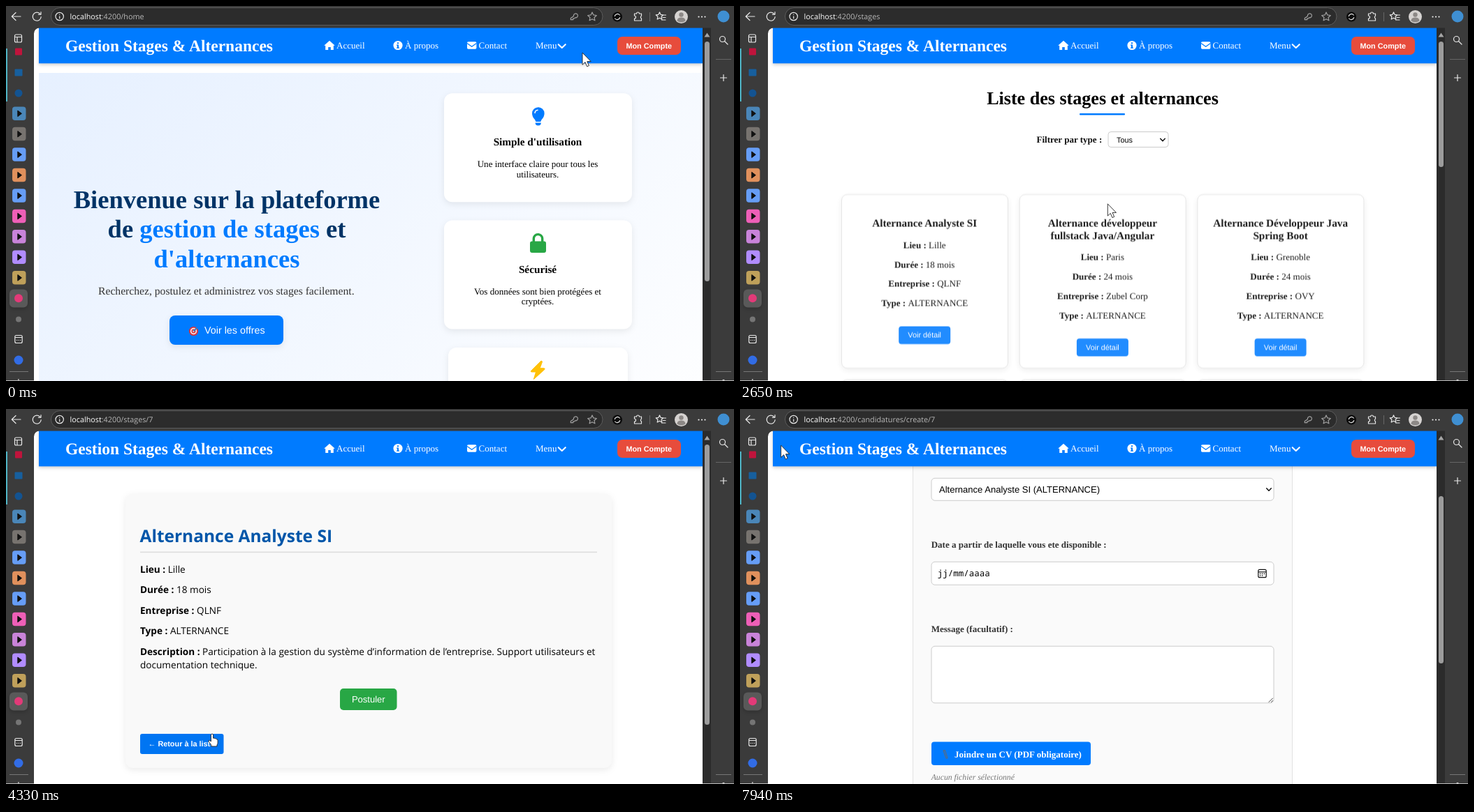
Animation of 1042 by 538 pixels, one loop 8000 ms. Source, as an HTML page:

```html
<!DOCTYPE html>
<html lang="fr">
<head>
<meta charset="utf-8">
<title>Gestion Stages &amp; Alternances</title>
<style>
html, body { margin: 0; width: 100%; height: 100%; overflow: hidden; background: #3b3b3b; }
svg { display: block; width: 100%; height: 100%; }
text { white-space: pre; font: 13.04px "Liberation Serif", "Times New Roman", serif; text-rendering: geometricPrecision; }
.b { font-weight: bold; }
.i { font-style: italic; }
.sans { font-family: "Liberation Sans", Arial, sans-serif; }
.ui { font-family: "Open Sans", "Noto Sans", sans-serif; }
.mono { font-family: "Noto Sans Mono", "DejaVu Sans Mono", monospace; }
.soft { filter: drop-shadow(0 3px 5px rgba(0,0,0,.08)); }
.deep { filter: drop-shadow(0 2px 2.5px rgba(0,0,0,.2)); }
.line { fill: none; stroke: #e8e8e8; stroke-width: 1.2; stroke-linecap: round; stroke-linejoin: round; }
</style>
</head>
<body>
<svg id="stage" viewBox="0 0 1042 538" preserveAspectRatio="none" xmlns="http://www.w3.org/2000/svg"></svg>
<script>
const LOOP = 8000, STEP = 67.86;
const BLUE = '#007bff';

// ---- drawing helpers ----
const text = (x, y, s, o = {}) =>
  `<text x="${x}" y="${y}" class="${o.c || ''}" fill="${o.fill || '#000'}"` +
  `${o.mid ? ' text-anchor="middle"' : ''} ${o.id ? `id="${o.id}"` : ''} style="font-size:${o.size || 13.04}px">${s}</text>`;
const mid = (x, y, s, o = {}) => text(x, y, s, { ...o, mid: true });
const rect = (x, y, w, h, fill, r = 0, extra = '') =>
  `<rect x="${x}" y="${y}" width="${w}" height="${h}" rx="${r}" fill="${fill}" ${extra}/>`;
const disc = (x, y, r, fill, extra = '') => `<circle cx="${x}" cy="${y}" r="${r}" fill="${fill}" ${extra}/>`;
const path = (d, fill, extra = '') => `<path d="${d}" fill="${fill}" ${extra}/>`;
const line = (d, extra = '') => `<path class="line" d="${d}" ${extra}/>`;
const group = (id, s) => `<g id="${id}">${s}</g>`;
const field = (x, y, w, h, r) => rect(x, y, w, h, '#fff', r, 'stroke="#ccc"');
const chevron = (x, y) => line(`M${x - 3.3} ${y - 1.7}l3.3 3.4l3.3 -3.4`, 'style="stroke:#111;stroke-width:1.5"');
const bold = s => `<tspan class="b">${s}</tspan>`;

// ---- home ----
function feature(y, title, lines) {
  return rect(627, y, 269, 156, '#fff', 12, 'class="soft"') +
    mid(761, y + 75, title, { c: 'b', size: 15.26 }) +
    lines.map((s, i) => mid(761, y + 106 + i * 14.6, s)).join('');
}
const bulb = path('M757 163q-4-4-4-9a8.8 8.8 0 0 1 17.6 0q0 5-4 9l-1.4 3h-6.8z', BLUE) +
  path('M757.6 167.5h8.2q0 4-4.1 4t-4.1-4z', BLUE) +
  '<path d="M757 154q0-4.6 4.6-4.8" fill="none" stroke="#fff" stroke-width="1.5"/>';
const lock = rect(750, 337.5, 23, 16.5, '#28a745', 3) +
  '<path d="M755.3 339v-5.2a6.2 6.2 0 0 1 12.4 0v5.2" fill="none" stroke="#28a745" stroke-width="3.4"/>';
const target = [[6.6, '#d8343f'], [4.7, '#f6e9ea'], [3, '#d8343f'], [1.2, '#fff']]
  .map(([r, f]) => disc(268.5, 466.5, r, f)).join('') +
  '<path d="M268.5 466.5l5-5" stroke="#2d7fc4" stroke-width="1.8"/>';
const home =
  rect(47, 96, 950, 442, 'url(#hero)') +
  mid(316, 289.5, 'Bienvenue sur la plateforme', { c: 'b', size: 36.52, fill: '#036' }) +
  mid(316, 332.3, `de <tspan fill="${BLUE}">gestion de stages</tspan> et`, { c: 'b', size: 36.52, fill: '#036' }) +
  mid(316, 375, "d'alternances", { c: 'b', size: 36.52, fill: BLUE }) +
  mid(315.3, 413.6, 'Recherchez, postulez et administrez vos stages facilement.', { size: 15.65, fill: '#333' }) +
  rect(234, 444, 163, 42, BLUE, 8, 'class="soft"') + target +
  text(284, 470, 'Voir les offres', { c: 'sans', size: 14.34, fill: '#fff' }) +
  feature(125.3, "Simple d'utilisation", ['Une interface claire pour tous les', 'utilisateurs.']) + bulb +
  feature(307.5, 'Sécurisé', ['Vos données sont bien protégées et', 'cryptées.']) + lock +
  rect(633, 490, 257, 156, '#fff', 12, 'class="soft"') +
  path('M766 509l-14.5 14.5q-.8 1.5 1 1.5h6l-3.2 10.5l15.5-14q1-1.7-1-1.8h-5.6l3.4-9.6z', '#ffc107', 'stroke="#ffc107" stroke-linejoin="round"');

// ---- list of offers ----
const OFFERS = [
  [145, ['Alternance Analyste SI'], 'Lille', '18 mois', 'QLNF'],
  [399.7, ['Alternance développeur', 'fullstack Java/Angular'], 'Paris', '24 mois', 'Zubel Corp'],
  [654.4, ['Alternance Développeur Java', 'Spring Boot'], 'Grenoble', '24 mois', 'OVY']
];
const panel = (x, y) => rect(x + .5, y, 238, 249, '#fff', 8, 'stroke="#e3e3e3" class="soft"');
function offer([x, title, place, time, firm], i) {
  const c = x + 119.2, dy = 268 + (title.length - 1) * 17.5;
  const rows = [['Lieu', place], ['Durée', time], ['Entreprise', firm], ['Type', 'ALTERNANCE']];
  return group('offer' + i, panel(x, 268) +
    title.map((s, k) => mid(c, 314 + k * 17.5, s, { c: 'b', size: 15.26 })).join('') +
    rows.map(([k, v], n) => mid(c, dy + 76.7 + n * 27.8, bold(k + ' : ') + v)).join('') +
    rect(c - 37, dy + 189, 74, 25.5, BLUE, 4) +
    mid(c, dy + 205.4, 'Voir détail', { c: 'sans', size: 10.87, fill: '#fff' }));
}
const list =
  mid(519, 141.3, 'Liste des stages et alternances', { c: 'b', size: 26.08 }) +
  rect(486, 154, 65, 2.4, BLUE, 1) +
  text(424.5, 196, 'Filtrer par type :', { c: 'b', fill: '#111' }) +
  field(527, 180.5, 86, 22, 4) + text(539, 195.7, 'Tous', { c: 'sans', size: 10.87 }) + chevron(605, 192) +
  group('cards', OFFERS.map(offer).join('') + OFFERS.map(o => panel(o[0], 533.5)).join(''));

// ---- offer detail ----
const detail =
  rect(171, 121, 696, 394, '#f9f9f9', 11, 'class="soft"') +
  text(191.5, 191, 'Alternance Analyste SI', { c: 'ui b', size: 24.5, fill: '#0056a9' }) +
  rect(192, 204.6, 654, 1.6, '#ddd') +
  [['Lieu', 'Lille'], ['Durée', '18 mois'], ['Entreprise', 'QLNF'], ['Type', 'ALTERNANCE'],
   ['Description', 'Participation à la gestion du système d’information de l’entreprise. Support utilisateurs et']]
    .map(([k, v], i) => text(192, 234.6 + i * 29.6, bold(k + ' : ') + v, { c: 'ui', size: 13.6 })).join('') +
  text(192, 372, 'documentation technique.', { c: 'ui', size: 13.6 }) +
  rect(478, 401, 81.5, 31, '#28a745', 5, 'id="apply"') +
  mid(518.8, 420.7, 'Postuler', { c: 'sans', fill: '#fff' }) +
  rect(192, 466, 119.5, 29, BLUE, 3, 'id="back"') +
  text(203.5, 484.2, '← Retour à la liste', { c: 'sans b', size: 10.87, fill: '#fff' });

// ---- application form ----
const label = (y, s) => text(273.7, y, s, { c: 'b', fill: '#333' });
const agenda = '<g fill="none" stroke="#111" stroke-width="1.2"><rect x="741.8" y="393.3" width="11.4" height="11.4" rx="2"/><path d="M742 396.8h11"/></g>' +
  [0, 1, 2, 3, 4].map(i => disc(744.6 + i % 3 * 2.9, 399.4 + (i > 2) * 2.7, .8, '#111')).join('');
const clip = '<path d="M291.5 654l3.2 9.2q1 1.8 2.2.3l-3-9.6q-1.2-2.2-2.8-.8l3 8" fill="none" stroke="#5d6b7c" stroke-width="1.2"/>';
const form =
  mid(519, 130.2, 'Créer une candidature', { c: 'b', size: 19.56, fill: '#1e3a8a' }) +
  rect(247.5, 161.5, 543, 700, '#fafafa', 6, 'stroke="#e2e2e2"') +
  label(242, 'Sélectionner un stage/alternance :') +
  field(274, 262.3, 490, 32, 5) + text(285, 283, '', { c: 'sans', id: 'choice' }) + chevron(757, 278.5) +
  label(362, 'Date a partir de laquelle vous ete disponible :') +
  field(274, 382.3, 490, 33, 5) + text(282.7, 403.3, 'jj/mm/aaaa', { c: 'mono', size: 12.5 }) + agenda +
  label(483, 'Message (facultatif) :') + field(274, 503.3, 490, 81.5, 5) +
  line('M757 583.5l5.5-5.5M760.5 583.5l2-2', 'style="stroke:#444;stroke-width:1"') +
  rect(274, 640.5, 228, 33.5, BLUE, 4) + clip +
  text(307, 663, 'Joindre un CV (PDF obligatoire)', { c: 'b', fill: '#fff' }) +
  text(273.7, 695, 'Aucun fichier sélectionné', { c: 'i', size: 11.74, fill: '#777' });

// ---- site header ----
const nav = (x, s) => text(x, 61.3, s, { fill: '#fff' });
const header =
  rect(47, 31, 950, 51.3, BLUE, 0, 'class="deep"') +
  text(85, 65, 'Gestion Stages &amp; Alternances', { c: 'b', size: 23.5, fill: '#fff' }) +
  path('M463 49.8l7.8 7h-2v6.2h-4v-4h-3.6v4h-4v-6.2h-2z', '#fff') + nav(473, 'Accueil') +
  disc(561, 56.5, 6.6, '#fff') + path('M560 52.2h2v2h-2zM559 55.5h3v4h1v1.3h-4v-1.3h1v-2.7h-1z', BLUE) + nav(571, 'À propos') +
  rect(660, 51.3, 13.4, 10.4, '#fff', 1.6) +
  `<path d="M660 53.5l6.7 4.8l6.7-4.8" fill="none" stroke="${BLUE}" stroke-width="1.2"/>` + nav(676.5, 'Contact') +
  nav(758, 'Menu') + line('M790.7 55.2l5 4.8l5-4.8', 'style="stroke:#fff;stroke-width:2.1"') +
  rect(875, 44, 91, 26, '#e74c3c', 7) + mid(920.3, 60.8, 'Mon Compte', { c: 'sans b', size: 10.87, fill: '#fff' });
const menu =
  rect(746, 74, 163.5, 62.5, BLUE, 3, 'class="deep"') + rect(746, 74, 163.5, 31, '#2490ff', 2, 'id="pick"') +
  text(758, 94, 'Stages/Alternances') + text(758, 125, 'Mes Candidatures');

// ---- browser window ----
const DARK = '#3b3b3b';
const TABS = ['#4a86b8', '#77736f', '#669df6', '#e0905c', '#669df6', '#ee5fb7', '#c983d9', '#b18cff', '#bfa05a'];
const star = (x, y, r) => 'M' + Array.from({ length: 10 }, (_, i) => {
  const a = i * Math.PI / 5 - Math.PI / 2, q = i % 2 ? r * .48 : r;
  return (x + q * Math.cos(a)).toFixed(1) + ' ' + (y + q * Math.sin(a)).toFixed(1);
}).join('L') + 'z';
const grey = 'style="stroke:#a0a0a0"';
const chrome =
  path('M0 0H1042V538H1009V31.5H48a8 8 0 0 0-8 8V538H0z', DARK) +
  rect(64.5, 2.5, 789.5, 25, '#2c2c2c', 12.5, 'stroke="#5c5c5c"') +
  line('M21 15H8.5M14 9.5L8.3 15l5.7 5.5') +
  line('M49 11.5a6 6 0 1 0 1.2 4M50 8.5v3.6h-3.6') +
  line('M71 15a5.7 5.7 0 1 0 11.4 0a5.7 5.7 0 1 0-11.4 0M76.7 14.8v3M76.7 12.2v.1') +
  text(91.5, 19.2, '', { c: 'ui', size: 10.8, fill: '#b8b8b8', id: 'address' }) +
  line('M812.5 14.5a3 3 0 1 1 2.2 2.2l-1.2 1.2h-1.8v1.8h-3.4v-2.2z', grey) +
  line(star(839, 15.5, 6.6), grey) +
  disc(875, 15.5, 7, '#0c0c0c') + line('M871.3 14.5a4 4 0 0 1 7-1.5M878.7 16.5a4 4 0 0 1-7 1.5') +
  line('M899.5 11h3a2 2 0 0 1 4 0h3v3.2a2 2 0 0 0 0 3.6V21h-10v-3a2 2 0 0 0 0-4z') +
  rect(921, 9, 1, 13, '#666') +
  line(star(935.5, 14.5, 5.6) + 'M940.5 13h4M940 16.5h4M938.5 20h5.5') +
  disc(966.5, 15.5, 9.5, '#d6d3d1') + disc(966.5, 12.5, 3.2, '#8c8886') + path('M960.5 21.5q0-5 6-5t6 5q-6 4-12 0z', '#8c8886') +
  [991.5, 996, 1000.5].map(x => disc(x, 15.5, 1.1, '#eee')).join('') +
  disc(1027, 15, 8.5, '#3f8fd2') +
  // left strip
  rect(0, 61, 2, 76, '#4fb3c4') +
  line('M12.5 43a2 2 0 0 1 2-2h6a2 2 0 0 1 2 2v7a2 2 0 0 1-2 2h-6a2 2 0 0 1-2-2zM12.5 44.5h10M16 44.5v7') +
  rect(13, 60.5, 10, 10, '#c0143c', 1) + rect(12.5, 90.5, 11, 10, '#175f9e', 1) + disc(18, 125, 5.5, '#135391') +
  TABS.map((f, i) => rect(9, 144.4 + i * 29.45, 19.5, 19.5, f, 4) +
    path(`M16.8 ${150 + i * 29.45}l5.6 4.3l-5.6 4.3z`, '#111', 'stroke="#111" stroke-linejoin="round"')).join('') +
  rect(5, 406.5, 26, 26, '#595959', 6, 'class="deep"') + disc(18, 419.3, 6, '#e23a78') +
  disc(18, 449.5, 4, '#757575') +
  line('M12.8 474.5a2 2 0 0 1 2-2h6.4a2 2 0 0 1 2 2v7a2 2 0 0 1-2 2h-6.4a2 2 0 0 1-2-2zM13 475.5h10M15.5 479.5h.1M18 479.5h.1M20.5 479.5h.1') +
  disc(18, 508, 6.5, '#326ce5') +
  rect(5, 524, 27, 1, '#777') + rect(17.3, 535, 1.2, 3, '#ddd') +
  // right strip
  line('M1021.5 47.5a4 4 0 1 0 8 0a4 4 0 1 0-8 0M1028.5 50.5l4.5 4.5') +
  rect(1016, 76, 22, 1, '#666') + line('M1022.5 103h9M1027 98.5v9') +
  rect(1016, 524, 22, 1, '#777') + disc(1027, 537.5, 1.8, '#ddd') +
  rect(0, 537, 40, 1, '#bbb') + rect(997, 537, 45, 1, '#bbb');
const scrollbar = rect(997, 31, 12, 507, '#2b2b2b') + path('M1003.5 38.5l4 6h-8z', '#a5a5a5') +
  rect(1000, 51, 7, 100, '#9c9c9c', 3.5, 'id="thumb"');

const cursor =
  path('M0 0V17.3L4 13.6L6.6 19.8L9.4 18.6L6.8 12.6H12.2z', '#fff', 'id="arrow" stroke="#222" stroke-width=".9" stroke-linejoin="round"') +
  path('M-2.6 0Q-1-2 .6 0V5.3Q2.2 4.3 3 5.8Q4.6 5.1 5.3 6.8Q7 6.4 7.1 8.4V12Q7 13.8 6 15V17H-2V15.2L-6 10Q-6.4 7.9-4.6 8.4L-2.6 10z',
    '#fff', 'id="hand" stroke="#222" stroke-width=".9" stroke-linejoin="round"');

document.getElementById('stage').innerHTML =
  '<defs><linearGradient id="hero" gradientUnits="userSpaceOnUse" x1="144" y1="-1" x2="900" y2="754">' +
  '<stop stop-color="#e6f0ff"/><stop offset="1" stop-color="#fff"/></linearGradient></defs>' +
  rect(0, 0, 1042, 538, '#fff') +
  group('home', home) + group('list', list) + group('detail', detail) + group('form', form) +
  header + group('menu', menu) + scrollbar + chrome + group('cursor', cursor);

// ---- timeline ----
const $ = id => document.getElementById(id);
const PAGES = [
  [0, 'home', 'home', 344], [2270, 'list', 'stages', 180],
  [4050, 'detail', 'stages/7', 402], [5620, 'form', 'candidatures/create/7', 240]
];
const POINTER = [
  [70, 825, 67], [290, 795, 44], [420, 788, 54], [620, 780, 78], [810, 785, 90],
  [900, 785, 90], [1350, 800, 117], [1500, 800, 117], [1760, 803, 91], [1930, 803, 91],
  [2100, 800, 86], [2240, 796, 90], [2450, 640, 205], [2647, 526, 284], [2720, 508, 310],
  [2950, 290, 470], [3120, 98, 515], [3300, 200, 490], [3440, 350, 468], [3529, 414, 463],
  [3595, 424, 462], [3850, 272, 468], [4080, 270, 469], [4240, 288, 472], [4340, 296, 467],
  [4410, 296, 467], [4700, 380, 430], [5020, 518, 391], [5240, 513, 402],
  [5430, 513, 402], [5497, 509, 402], [5564, 509, 402], [5632, 512, 411],
  [5900, 470, 340], [6170, 388, 279], [6300, 388, 280], [6440, 391, 297],
  [6720, 410, 329], [7397, 410, 329], [7600, 300, 235], [7800, 120, 92], [7940, 58.5, 52]
];
const HAND = [[280, 2260], [3810, 4050], [4220, 4530], [5080, 5600]];
const LIFTS = [
  [[2890, 0], [3030, 4], [3100, 4], [3230, 1], [3420, 3.6], [3529, .8], [3600, 0], [3740, 0], [3950, 4]],
  [[3400, 0], [3529, 2.6], [3600, 3.8], [3720, 3.8], [3920, 0]]
];
const SCROLL = [[6930, 0], [7050, 70], [7120, 130], [7190, 163]];
const BACK_HOVER = [[4260, 0], [4340, .3], [4400, 1], [4500, 1], [4740, 0]];
const APPLY_HOVER = [[5040, 0], [5230, 1]];

function at(track, t, k = 1) {
  if (t <= track[0][0]) return track[0][k];
  const i = track.findIndex(p => p[0] > t);
  if (i < 0) return track[track.length - 1][k];
  const a = track[i - 1], b = track[i];
  return a[k] + (b[k] - a[k]) * (t - a[0]) / (b[0] - a[0]);
}
const show = (id, on) => { $(id).style.display = on ? '' : 'none'; };
const move = (id, x, y) => $(id).setAttribute('transform', `translate(${x.toFixed(2)} ${y.toFixed(2)})`);
const blend = (a, b, p) => `rgb(${a.map((v, i) => Math.round(v + (b[i] - v) * p))})`;

function draw(t) {
  const page = PAGES.filter(p => p[0] <= t).pop();
  PAGES.forEach(p => show(p[1], p === page));
  $('address').innerHTML = `<tspan fill="#fff">localhost</tspan>:4200/${page[2]}`;

  const scroll = at(SCROLL, t);
  $('thumb').setAttribute('height', page[3]);
  $('thumb').setAttribute('y', 51 + scroll * .454);
  move('form', 0, -scroll);
  $('choice').textContent = t < 6960 ? '-- Choisissez un stage --' : 'Alternance Analyste SI (ALTERNANCE)';

  const left = (1 - Math.min(1, Math.max(0, (t - 2290) / 600))) ** 2.3;
  move('cards', 0, 20 * left);
  $('cards').setAttribute('opacity', 1 - left);
  LIFTS.forEach((track, i) => move('offer' + i, 0, -at(track, t)));

  $('back').setAttribute('fill', blend([0, 123, 255], [0, 105, 217], at(BACK_HOVER, t)));
  $('apply').setAttribute('fill', blend([40, 167, 69], [33, 136, 56], at(APPLY_HOVER, t)));

  const x = at(POINTER, t), y = at(POINTER, t, 2);
  const hand = HAND.some(([a, b]) => t >= a && t < b);
  move('cursor', x, y);
  show('hand', hand);
  show('arrow', !hand);
  show('menu', t >= 280 && t < 2260);
  show('pick', y >= 74);
  $('pick').setAttribute('y', y < 105 ? 74 : 105.5);
}

let last = -1;
function tick() {
  const step = Math.floor((performance.now() % LOOP + 14) / STEP);
  if (step !== last) draw(Math.min(step * STEP, LOOP));
  last = step;
  requestAnimationFrame(tick);
}
tick();
</script>
</body>
</html>
```
